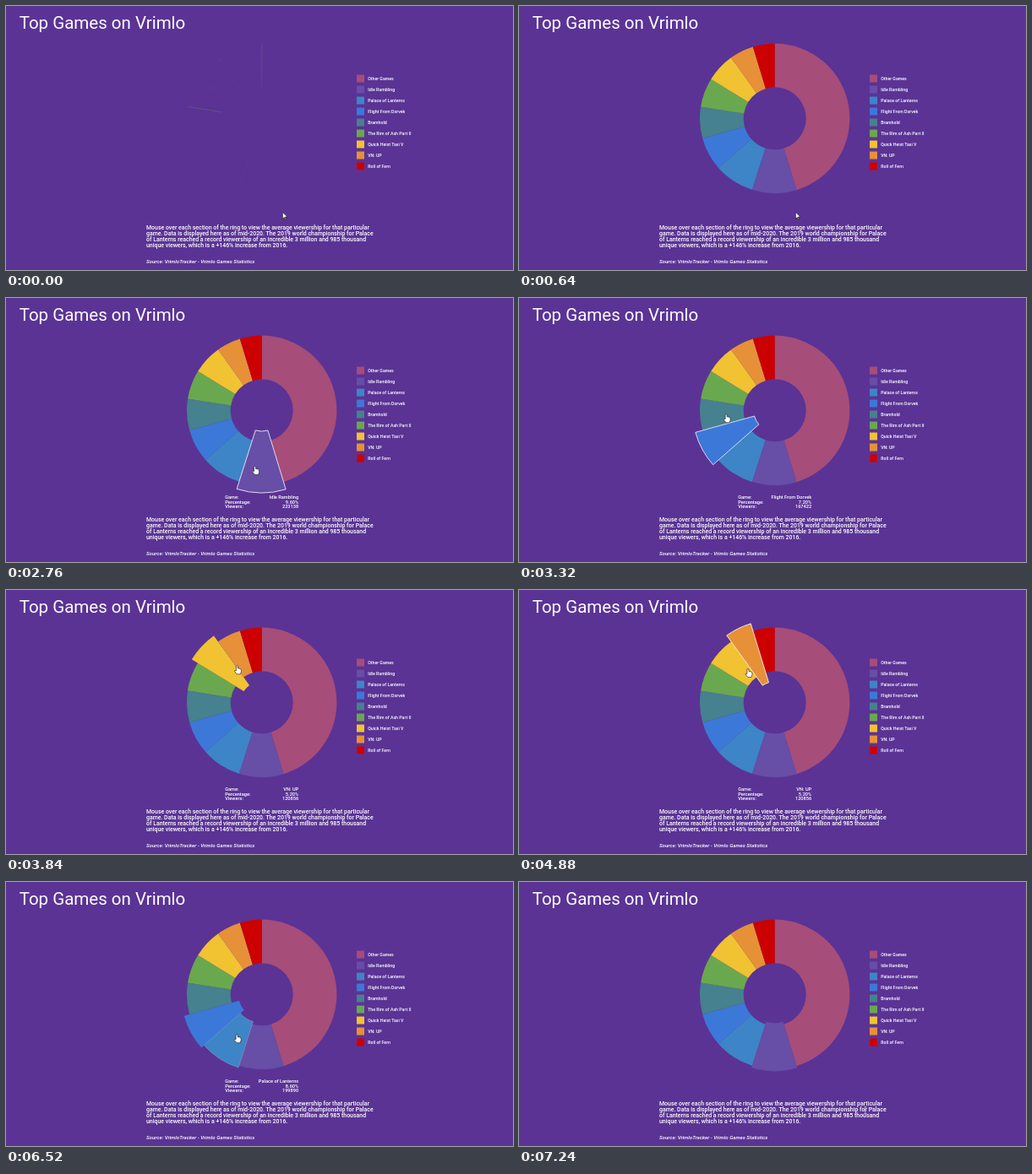
An HTML page for the animation above (7.28 s loop, 600 by 313 pixels).

```html
<!DOCTYPE html>
<html lang="en">
<head>
<meta charset="utf-8">
<title>Top Games on Vrimlo</title>
<style>
  html, body { margin: 0; width: 100%; height: 100%; overflow: hidden; background: #5b3395; }
  svg { display: block; width: 100vw; height: 100vh; }
  text { font-family: Roboto, Arial, sans-serif; font-weight: 500; fill: #fff; white-space: pre; }
  #title { font-size: 20.5px; font-weight: 400; }
  #note { font-size: 6.94px; }
  #source { font-size: 6.13px; font-style: italic; }
  #legend { font-size: 5.22px; }
  #info { font-size: 5.65px; }
  .value { text-anchor: end; }
  #arrow, #hand { fill: #fff; stroke: #111; stroke-width: .6; }
  #beam { fill: none; stroke: #b9b3c2; stroke-width: .9; }
</style>
</head>
<body>
<svg viewBox="0 0 600 313">
  <rect width="600" height="313" fill="#5b3395"/>
  <text id="title" x="15.7" y="26.5">Top Games on Vrimlo</text>
  <g id="ring"></g>
  <path id="outline" fill="none" stroke="#fff" stroke-width=".8"/>
  <g id="legend"></g>
  <g id="info"></g>
  <g id="note"></g>
  <text id="source" x="166" y="304.7">Source: VrimloTracker - Vrimlo Games Statistics</text>
  <g id="cursor">
    <path id="arrow" d="M0 0V7.5L2 6L3 8.5L4 8L3 5.5H5.5Z"/>
    <path id="hand" d="M-1 .5Q0-.5 1 .5V3Q4 3 5 4.5V7L4 10H0L-3 6.5Q-3 5-1 6Z"/>
    <path id="beam" d="M-1.6-4H1.6M0-4V4M-1.6 4H1.6"/>
  </g>
</svg>
<script>
const LOOP = 7280, STEP = 40, GROW = 600, POP = 200, LAG = 80;
const CX = 302.7, CY = 133.3, INNER = 37, OUTER = 88.7, NOTE_TOP = 258;
const TURN = 2 * Math.PI;

const games = [
  { name: 'Other Games', viewers: 1052908, color: '#a64d79' },
  { name: 'Idle Rambling', viewers: 223138, color: '#674ea7' },
  { name: 'Palace of Lanterns', viewers: 199890, color: '#3d85c6' },
  { name: 'Flight From Dorvek', viewers: 167422, color: '#3c78d8' },
  { name: 'Bramhold', viewers: 158052, color: '#45818e' },
  { name: 'The Rim of Ash Part II', viewers: 146431, color: '#6aa84f' },
  { name: 'Quick Heist Taxi V', viewers: 146430, color: '#f1c232' },
  { name: 'VN: UP', viewers: 120856, color: '#e69138' },
  { name: 'Roll of Fern', viewers: 109242, color: '#cc0000' }
];

// pointer rests around the ring: arrive, leave, degrees clockwise from the top, radius
const stops = [
  [0, 760, 167.5, 114],
  [1400, 1800, 135, 58],
  [2760, 2760, 187, 66.7],
  [3740, 3740, 324.5, 51],
  [4360, 4600, 334, 60],
  [4880, 4880, 321.5, 51],
  [5400, 5400, 250, 55],
  [5720, 6200, 241.3, 50.4],
  [6760, 6920, 190, 60],
  [7240, LOOP, 142, 174]
];

const $ = id => document.getElementById(id);
const clamp = v => Math.min(1, Math.max(0, v));
const mix = (a, b, k) => a + (b - a) * k;
const ease = v => (v = clamp(v)) < .5 ? 4 * v ** 3 : 1 - 4 * (1 - v) ** 3;
const polar = (r, a) => [CX + r * Math.sin(a), CY - r * Math.cos(a)].map(v => v.toFixed(2));

function add(parent, tag, attrs, text = '') {
  const node = document.createElementNS('http://www.w3.org/2000/svg', tag);
  for (const key in attrs) node.setAttribute(key, attrs[key]);
  node.textContent = text;
  return $(parent).appendChild(node);
}

function sector(from, to, inner, outer) {
  return `M${polar(outer, from)}A${outer} ${outer} 0 0 1 ${polar(outer, to)}` +
    `L${polar(inner, to)}A${inner} ${inner} 0 0 0 ${polar(inner, from)}Z`;
}

const total = games.reduce((sum, game) => sum + game.viewers, 0);
let angle = 0;
games.forEach((game, i) => {
  game.share = game.viewers / total;
  game.from = angle;
  game.to = angle += game.share * TURN;
  game.node = add('ring', 'path', { fill: game.color });
  add('legend', 'rect', { x: 415, y: 81.5 + 13 * i, width: 9, height: 9, fill: game.color });
  add('legend', 'text', { x: 428.2, y: 87.8 + 13 * i }, game.name);
});

[
  'Mouse over each section of the ring to view the average viewership for that particular',
  'game. Data is displayed here as of mid-2020. The 2019 world championship for Palace',
  'of Lanterns reached a record viewership of an incredible 3 million and 985 thousand',
  'unique viewers, which is a +146% increase from 2016.'
].forEach((line, i) => add('note', 'text', { x: 166, y: 265.1 + 7 * i }, line));

const values = ['Game:', 'Percentage:', 'Viewers:'].map((label, i) => {
  const y = 238.2 + 5.5 * i;
  add('info', 'text', { x: 259.2, y }, label);
  return add('info', 'text', { x: 346.2, y, class: 'value' });
});

function pointerAt(t) {
  const i = stops.findLastIndex(stop => stop[0] <= t);
  const [, leave, a0, r0] = stops[i];
  const [arrive, , a1, r1] = stops[i + 1] || stops[i];
  const k = t > leave ? (t - leave) / (arrive - leave) : 0;
  return { angle: mix(a0, a1, k) / 360 * TURN, radius: mix(r0, r1, k) };
}

function hoveredAt(t) {
  const { angle, radius } = pointerAt(Math.max(0, t - LAG));
  return radius > OUTER ? undefined : games.find(game => angle < game.to);
}

// consecutive spans of time, each with the game under the pointer
const spans = [];
for (let t = 0; t < LOOP; t += STEP) {
  const game = hoveredAt(t), last = spans[spans.length - 1];
  if (last && last.game === game) last.end = t + STEP;
  else spans.push({ game, start: t, end: t + STEP });
}

function popAmount(game, t) {
  return Math.max(0, ...spans.filter(span => span.game === game).map(({ start, end }) =>
    ease((t - start) / POP) * (1 - ease((t - end) / POP))));
}

function render(t) {
  const active = hoveredAt(t);
  const grown = Math.max(ease(t / GROW), .002);

  for (const game of games) {
    const pop = popAmount(game, t);
    const to = mix(game.from, game.to, grown);
    game.node.setAttribute('d', sector(game.from, to, INNER - 12.3 * pop, OUTER + 9 * pop));
  }

  $('outline').setAttribute('d', active ? active.node.getAttribute('d') : '');
  $('outline').setAttribute('opacity', active ? popAmount(active, t) : 0);
  $('info').style.display = active ? '' : 'none';
  if (active) {
    const { name, share, viewers } = active;
    [name, (share * 100).toFixed(2) + '%', viewers].forEach((v, i) => values[i].textContent = v);
  }

  const { angle, radius } = pointerAt(t);
  const [x, y] = polar(radius, angle);
  const shape = active ? 'hand' : y > NOTE_TOP ? 'beam' : 'arrow';
  $('cursor').setAttribute('transform', `translate(${x} ${y})`);
  for (const id of ['arrow', 'hand', 'beam']) $(id).style.display = id === shape ? '' : 'none';
}

const begin = performance.now();
function tick() {
  const t = (performance.now() - begin) % LOOP;
  render(Math.floor(t / STEP) * STEP);
  requestAnimationFrame(tick);
}
tick();
</script>
</body>
</html>
```
